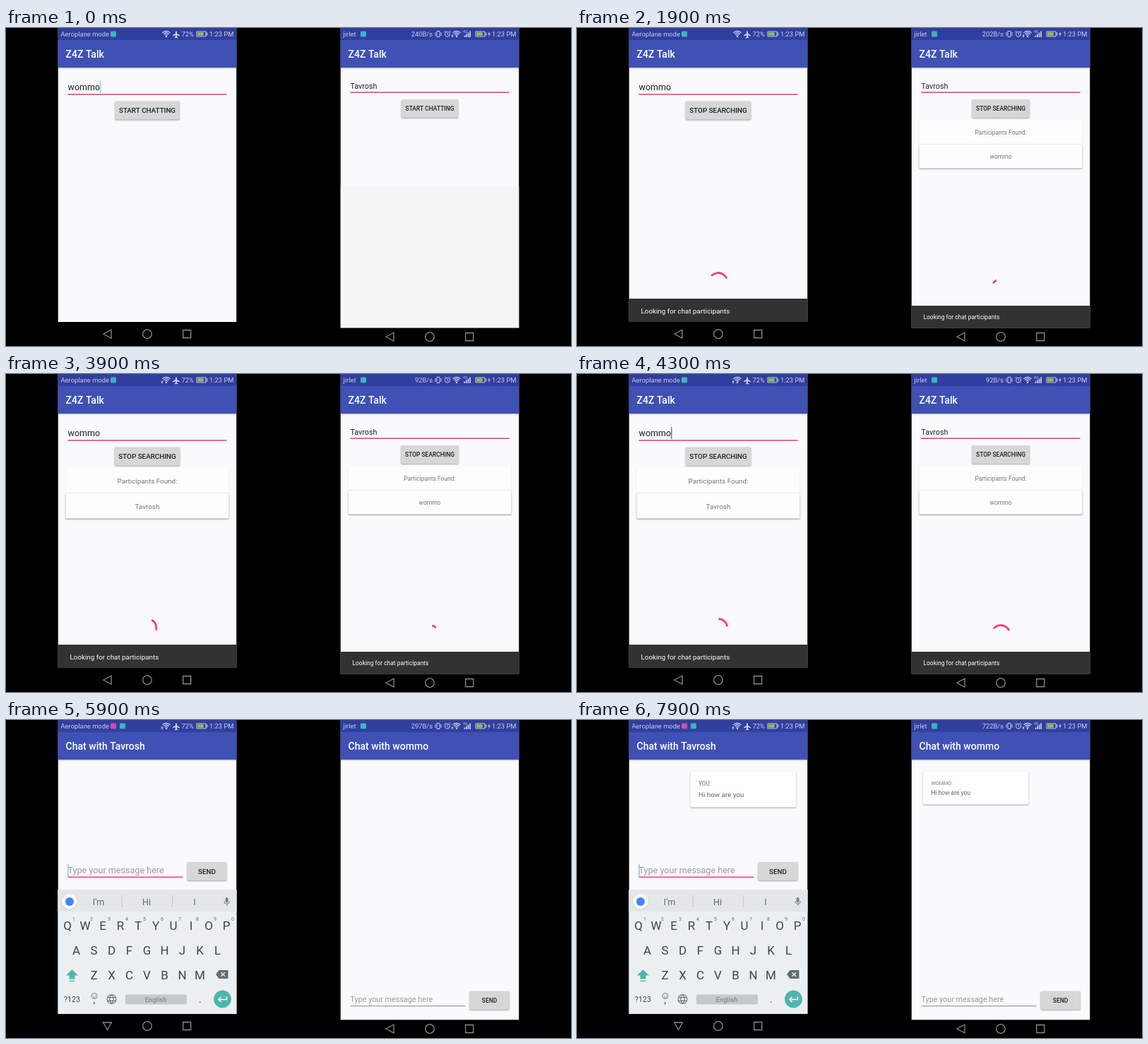
Write an HTML page with a canvas that moves like this. It is 800 by 450 pixels and loops after 8000 ms.

```html
<!DOCTYPE html>
<html lang="en">
<head>
<meta charset="utf-8">
<title>Two phones chatting</title>
<style>
  html, body { margin: 0; width: 100%; height: 100%; overflow: hidden; background: #000; }
  canvas { display: block; width: 800px; height: 450px; }
</style>
</head>
<body>
<canvas id="stage"></canvas>
<script>
const LOOP = 8000, W = 253;
const canvas = document.getElementById('stage');
const dpr = window.devicePixelRatio || 1;
canvas.width = 800 * dpr;
canvas.height = 450 * dpr;
const c = canvas.getContext('2d');

const APP = 'Z4Z Talk', HIM = 'Tavrosh', HER = 'wommo';
const PAPER = '#faf9fb', PINK = '#f0407f', TEAL = '#4db6ac', KEY = '#37474f', GREY = '#757575';

// k scales the text, h is the height of the app area
const left = {
  ox: 73.5, h: 416, k: 1, me: HER, peer: HIM, nav: 433,
  input: 88, line: 94, button: 103.5, cards: 133, row: 36, snack: 383, snackText: 403.7, spinY: 359.5,
  start: 330, found: 2500, slide: 4491, shift: -58, dim: 0.25,
  period: 673, phase: 0.16, angle: -139, rate: 238
};
const right = {
  ox: 473.5, h: 424.5, k: 0.858, me: HIM, peer: HER, nav: 437,
  input: 86.2, line: 91.2, button: 101, cards: 131, row: 34, snack: 393, snackText: 412.4, spinY: 368.5,
  start: 430, found: 1400, slide: 4357, shift: -93, dim: 0.32,
  period: 667, phase: 0.09, angle: -147, rate: 234
};

const clamp = x => Math.max(0, Math.min(1, x));
const easeOut = x => 1 - Math.pow(1 - clamp(x), 3);
const during = (t, a, b) => t >= a && t < b;
const stepAt = (t, steps) => steps.filter(s => t >= s[0]).pop()[1];

// cubic-bezier(.4, 0, .2, 1)
function standard(x) {
  let lo = 0, hi = 1;
  for (let i = 0; i < 16; i++) {
    const m = (lo + hi) / 2, n = 1 - m;
    if (1.2 * n * n * m + 0.6 * n * m * m + m * m * m < x) lo = m; else hi = m;
  }
  return lo * lo * (3 - 2 * lo);
}

function text(s, x, y, size, color, { w = 400, align = 'left', style = 'normal' } = {}) {
  c.font = `${style} ${w} ${size}px Roboto, sans-serif`;
  c.textAlign = align;
  c.fillStyle = color;
  c.fillText(s, x, y);
  return c.measureText(s).width;
}
function rect(x, y, w, h, color) {
  c.fillStyle = color;
  c.fillRect(x, y, w, h);
}
function round(x, y, w, h, r, color, shadow) {
  c.save();
  if (shadow) {
    c.shadowColor = `rgba(0,0,0,${shadow})`;
    c.shadowBlur = 2 * dpr;
    c.shadowOffsetY = dpr;
  }
  c.fillStyle = color;
  c.beginPath();
  c.roundRect(x, y, w, h, r);
  c.fill();
  c.restore();
}
function circle(x, y, r, color) {
  c.fillStyle = color;
  c.beginPath();
  c.arc(x, y, r, 0, 7);
  c.fill();
}
// SVG path placed at x, y
function path(d, x, y, { fill, stroke, lw = 1 }) {
  c.save();
  c.translate(x, y);
  const p = new Path2D(d);
  if (fill) { c.fillStyle = fill; c.fill(p); }
  if (stroke) { c.strokeStyle = stroke; c.lineWidth = lw; c.stroke(p); }
  c.restore();
}

const INK = '#c9cde6';

function wifi(x, data) {
  for (const r of [3, 5.5, 8]) {
    c.beginPath();
    c.arc(x, 12.5, r, -Math.PI * 0.75, -Math.PI * 0.25);
    c.strokeStyle = INK;
    c.lineWidth = 1.3;
    c.stroke();
  }
  circle(x, 12, 1.2, INK);
  if (data) path('M-6 9l1.6 2h-3.2zM-6 13.4l1.6-1.8h-3.2z', x, 0, { fill: INK });
}
function battery(x, bolt) {
  path('M0 0h13v7h-13zM13 2h2v3h-2', x, 5, { stroke: INK });
  rect(x + 1.2, 6.2, 8.6, 4.6, '#8bc34a');
  if (bolt) path('M2 0l-3 4h2l-1 4 3-5h-2z', x + 18, 4.7, { fill: INK });
}
function statusBar(p, t) {
  text('1:23 PM', 249, 12.2, 9.4, INK, { align: 'right' });
  if (p === left) {
    const end = 4 + text('Aeroplane mode', 4, 12.2, 9.4, INK);
    const keys = t >= 5550;
    if (keys) round(74.5, 4.5, 8, 8, 1.5, during(t, 6400, 7250) ? '#9a58c6' : '#c552a8');
    round(keys ? 87.5 : Math.max(74.5, end), 4.5, 8, 8, 1.5, '#3fb3bb');
    wifi(153.5, during(t, 2500, 4600) || t > 5500);
    path('M0-4.5q1 0 1 1.5v2l4 2.5v1.2l-4-1.2v2.3l1.3 1v.9l-2.3-.6-2.3.6v-.9l1.3-1v-2.3l-4 1.2v-1.2l4-2.5v-2q0-1.5 1-1.5z',
      167.5, 8.8, { fill: INK });
    text('72%', 175, 12.2, 9.4, INK);
    battery(196.5, false);
  } else {
    text('jirlet', 4, 12.2, 9.4, INK);
    round(28.5, 4.5, 8, 8, 1.5, '#3fb3bb');
    const speed = stepAt(t, [[0, 240], [1000, 202], [2900, 92], [5500, 297], [6400, 359], [7300, 722]]);
    text(speed + 'B/s', 130.5, 12.2, 9.4, INK, { align: 'right' });
    path('M-2-4h4v8h-4zM-4-2.5v5M4-2.5v5', 138.5, 8.5, { stroke: INK });
    path('M3.5 0a3.5 3.5 0 1 1-7 0a3.5 3.5 0 1 1 7 0M0-2v2l1.5 1M-4.5-3l2-1.7M4.5-3l-2-1.7', 151.5, 8.8, { stroke: INK });
    wifi(164.5, !during(t, 2900, 4500) && !during(t, 6400, 7000));
    text('4G', 173.5, 6.8, 5.2, INK);
    for (let i = 0; i < 4; i++) rect(175 + i * 2.6, 10.5 - i * 2, 1.7, 2.5 + i * 2, INK);
    battery(191.5, true);
  }
}

function page(p, title) {
  rect(0, 0, W, p.h, PAPER);
  rect(0, 56, W, 1, 'rgba(0,0,0,.22)');
  rect(0, 57, W, 1.2, 'rgba(0,0,0,.08)');
  rect(0, 0, W, 17, '#303f9f');
  rect(0, 17, W, 39, '#3f51b5');
  text(title, 11, 42, 14.06, '#fff', { w: 500 });
}
function button(p, label, x, y, w, down) {
  round(x, y, w, 26, 1.5, down ? '#c2c3c4' : '#d6d7d7', 0.35);
  text(label, x + w / 2, y + 13 + 3.5 * p.k, 9.84 * p.k, '#1f1f1f', { w: 500, align: 'center' });
}
function spinner(p, t) {
  const n = (t - 1900) / p.period + p.phase, whole = Math.floor(n), f = n - whole;
  const head = standard(Math.min(1, 2 * f)), tail = standard(Math.max(0, 2 * f - 1));
  const from = p.angle + p.rate * (n - p.phase) + 270 * (whole + tail);
  const sweep = Math.max(3, 270 * (head - tail));
  c.beginPath();
  c.arc(126.5, p.spinY, 13, from * Math.PI / 180, (from + sweep) * Math.PI / 180);
  c.strokeStyle = PINK;
  c.lineWidth = 2.8;
  c.stroke();
}
function searchPage(p, t) {
  page(p, APP);
  if (p === right && t < 300) rect(0, 225, W, p.h - 225, '#f5f5f5');
  const w = text(p.me, 14, p.input, 12.5 * p.k, '#222');
  if (p === left && t % 500 < 350) rect(14.3 + w, 75, 1, 17, t > 4000 ? '#444' : '#74cfc8');
  rect(14, p.line - 0.8, 225, 1.6, PINK);
  const going = t >= p.start + 100, bw = (going ? 92.5 : 91.5) - (p === right ? 11 : 0);
  button(p, going ? 'STOP SEARCHING' : 'START CHATTING', 126.5 - bw / 2, p.button, bw, during(t, p.start - 60, p.start + 100));
  if (t >= p.found) {
    const size = 9.84 * p.k;
    ['Participants Found:', p.peer].forEach((s, i) => {
      const y = p.cards + i * p.row;
      round(11, y, 231, p.row - 0.5, 1.5, '#fdfdfe', i ? 0.42 : 0.12);
      text(s, 126.5, y + p.row / 2 + 3.8 * p.k, size, GREY, { align: 'center' });
    });
  }
  if (going) {
    spinner(p, t);
    const drop = (p.h - p.snack) * (1 - easeOut((t - p.start - 100) / 250));
    rect(0, p.snack + drop, W, p.h - p.snack, '#323232');
    text('Looking for chat participants', 17, p.snackText + drop, 9.84 * p.k, '#fff');
  }
}

const SENT = 7650;
const KEYS_UP = 5500;
const rise = t => easeOut((t - KEYS_UP) / 300);

function chatPage(p, t) {
  page(p, 'Chat with ' + p.peer);
  const keys = p === left ? rise(t) : 0;
  const dy = p.h - 416 - 175 * keys - (p === right ? 0.8 : 0);
  const typed = p === left ? stepAt(t, [[0, ''], [6350, 'Hi'], [6700, 'Hi how'], [7150, 'Hi how are'], [7480, 'Hi how are you'], [SENT, '']]) : '';
  const size = 12.6 * p.k, base = 391.6 + dy - (p === right ? 0.8 : 0);
  let w = 0;
  if (typed) {
    w = text(typed, 14, base, size, '#222');
    const cut = typed.lastIndexOf(' ') + 1;
    const pre = c.measureText(typed.slice(0, cut)).width;
    rect(14 + pre, base + 1.4, w - pre, 1, '#333');
  } else {
    text('Type your message here', 14, base, size, '#9a999b');
  }
  const focus = keys > 0;
  rect(14, 396.6 + dy, 163, focus ? 1.6 : 1, focus ? PINK : '#858486');
  if (focus) rect(14 + w, 379 + dy, 1, 17, '#4fb8af');
  button(p, 'SEND', 183, 376 + dy, 56, focus && during(t, SENT - 80, SENT + 60));

  if (p === right && during(t, 6300, SENT + 50))
    text(HER + ' is typing...', 11, 377.6, 7.1, GREY, { style: 'italic' });
  if (t >= SENT + (p === right ? 50 : 0)) {
    const mine = p === left, x = mine ? 87 : 16.5;
    round(x, 72.5, 149.5, mine ? 51 : 47, 1.5, '#fefefe', 0.35);
    text(mine ? 'YOU:' : HER.toUpperCase() + ':', x + 11.5, mine ? 93.3 : 92, 8.3 * p.k, GREY);
    text('Hi how are you', x + 11.5, mine ? 109.4 : 106.3, 9.84 * p.k, '#666');
  }
  if (keys > 0) {
    c.save();
    c.translate(-p.ox, 176 * (1 - keys));
    keyboard(t);
    c.restore();
  }
}

// Keyboard and swipes use stage coordinates
const ROWS = [['QWERTYUIOP', 87, 297], ['ASDFGHJKL', 99.5, 332], ['ZXCVBNM', 124.5, 366.5]];
const SWIPES = [
  [6100, 6330, [[228, 326], [237, 300], [262, 290]]],
  [6560, 6800, [[228, 322], [242, 306], [262, 289], [205, 296], [135, 297], [107, 330]]],
  [6900, 7120, [[99, 326], [125, 300], [162, 290], [137, 291]]],
  [7230, 7450, [[212, 291], [250, 284], [287, 290], [237, 292]]]
];
function along(pts, u) {
  const n = clamp(u) * (pts.length - 1), i = Math.min(pts.length - 2, Math.floor(n)), f = n - i;
  return [0, 1].map(d => pts[i][d] + (pts[i + 1][d] - pts[i][d]) * f);
}
function swipe(t) {
  for (const [a, b, pts] of SWIPES) {
    if (!during(t, a, b + 60)) continue;
    const end = clamp((t - a) / (b - a)), N = 40;
    c.strokeStyle = '#9fd6d0';
    c.lineCap = 'round';
    for (let i = 0; i < N; i++) {
      c.beginPath();
      c.moveTo(...along(pts, end * i / N));
      c.lineTo(...along(pts, end * (i + 1) / N));
      c.lineWidth = 1.2 + 4 * i / N;
      c.stroke();
    }
    c.lineCap = 'butt';
    const [x, y] = along(pts, end);
    circle(x, y, 5, TEAL);
  }
}
function keyboard(t) {
  const upper = t < 6330 || t >= SENT;
  rect(73, 240, 254, 177, '#eceff1');
  rect(73, 240, 254, 31, '#e3e7ea');
  round(79.5, 246.5, 21, 21, 10.5, '#fff', 0.15);
  circle(90, 257, 6, '#4285f4');
  const words = stepAt(t, [[0, "I'm,Hi,I"], [6350, 'hire,Jot,his'], [7150, 'are,ate,age'], [7480, 'you,your,yo'], [SENT, "I'm,Hi,I"]]).split(',');
  words.forEach((s, i) => text(s, 131 + 68 * i, 261.7, 12.6, '#5b6a72', { align: 'center' }));
  rect(163.5, 248, 1, 17, '#c5cbcf');
  rect(235, 248, 1, 17, '#c5cbcf');
  round(310.7, 251, 4, 7.5, 2, '#78858b');
  path('M-3.7 0a3.7 3.7 0 0 0 7.4 0M0 3.7v2.6', 312.7, 256.5, { stroke: '#78858b', lw: 1.2 });

  for (const [row, x, y] of ROWS)
    [...row].forEach((ch, i) => text(upper ? ch : ch.toLowerCase(), x + 25 * i, y, 17, KEY, { align: 'center' }));
  for (let i = 0; i < 10; i++)
    text((i + 1) % 10, 96 + 25 * i, 284, 7, '#5f6d74', { align: 'center' });

  const shift = upper ? TEAL : '#68767d';
  path('M0-8l8.5 8.5h-4.5v5h-8v-5h-4.5z', 93.5, 361, { fill: shift });
  rect(89.5, 368.6, 8, 1.5, upper ? shift : '#8c979c');
  path('M-9 0l4.5-6h13v12h-13z', 306, 360, { fill: '#5f6d74' });
  path('M-2.5-2.8l5.6 5.6M3.1-2.8l-5.6 5.6', 307, 360, { stroke: '#eceff1', lw: 1.4 });

  text('?123', 93.5, 399, 10.6, KEY, { align: 'center' });
  path('M4 0a4 4 0 1 1-8 0a4 4 0 1 1 8 0M-2 1q2 2.5 4 0M-1.7-1.6v1M1.7-1.6v1', 125, 390.5, { stroke: '#68767d', lw: 0.9 });
  text(',', 125, 401, 14, KEY, { align: 'center' });
  path('M6.5 0a6.5 6.5 0 1 1-13 0a6.5 6.5 0 1 1 13 0M0-6.5q-5.5 6.5 0 13q5.5-6.5 0-13M-6-2.4h12M-6 2.4h12', 149.5, 395, { stroke: '#68767d', lw: 1.1 });
  round(169, 388.5, 87, 14, 2, '#c3c9cd');
  text('English', 212, 399, 9.5, '#6c7a81', { align: 'center' });
  text('.', 275, 399.5, 15, KEY, { align: 'center' });
  circle(306.5, 395, 12.4, TEAL);
  path('M6-3.5v4h-11M-2-3l-3.5 3.5 3.5 3.5', 306.5, 395, { stroke: '#fff', lw: 1.5 });

  swipe(t);
  if (during(t, 6740, 6860)) {
    round(111, 266, 28, 74, 2, '#cfd3d6', 0.35);
    text('s', 124.5, 291, 18, KEY, { align: 'center' });
    text('...', 131.5, 299, 9, KEY, { align: 'center' });
  }
}

function navBar(p, t) {
  const look = { stroke: '#8b8b8b', lw: 1.3 };
  const down = p === left && t >= KEYS_UP + 100;
  path(down ? 'M-6-5h12l-6 10.5z' : 'M-5.5 0l11-6v12z', 70, p.nav, look);
  path('M6.3 0a6.3 6.3 0 1 1-12.6 0a6.3 6.3 0 1 1 12.6 0', 126.5, p.nav, look);
  path('M-5.5-5.5h11v11h-11z', 182.7, p.nav, look);
}

function phone(p, t) {
  c.save();
  c.translate(p.ox, 0);
  navBar(p, t);
  c.beginPath();
  c.rect(0, 0, W, p.h);
  c.clip();
  const go = easeOut((t - p.slide) / 750);
  if (go < 1) {
    c.save();
    c.translate(p.shift * go, 0);
    searchPage(p, t);
    c.restore();
    rect(0, 0, W, p.h, `rgba(0,0,0,${p.dim * go})`);
  }
  if (go > 0) {
    c.save();
    c.translate(W * (1 - go), 0);
    chatPage(p, t);
    c.restore();
  }
  statusBar(p, t);
  c.restore();
}

function draw(t) {
  c.setTransform(dpr, 0, 0, dpr, 0, 0);
  rect(0, 0, 800, 450, '#000');
  phone(left, t);
  phone(right, t);
}

const begin = performance.now();
function tick() {
  draw((performance.now() - begin) % LOOP);
  requestAnimationFrame(tick);
}
tick();
</script>
</body>
</html>
```
